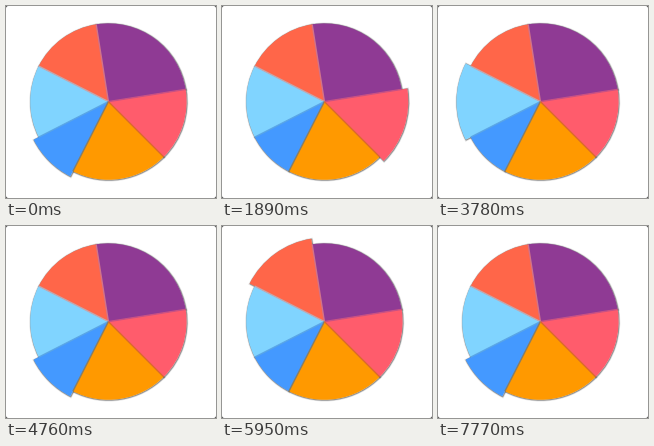
Recreate the animation shown at these times as a matplotlib script. Size 210x192 px, loop 8000 ms.

```python
import math

import matplotlib.pyplot as plt
from matplotlib.animation import FuncAnimation
from matplotlib.colors import to_rgb
from matplotlib.patches import FancyBboxPatch, Rectangle, Wedge

W, H, DPI = 210, 192, 100
LOOP, TICK, STEP = 8000, 20, 70
CENTER, RADIUS, POP = (102.4, 96.4), 78.2, 5.7
EASE_MS = 140

# name: (share in percent, colour), counter-clockwise from START
START = 9
SLICES = {
    "purple": (25, "#8f3a94"),
    "coral": (15, "#ff6649"),
    "sky": (15, "#80d4ff"),
    "blue": (10, "#4499ff"),
    "orange": (20, "#ff9900"),
    "pink": (15, "#ff5c6c"),
}

# (time in ms, slice that pops out)
CUES = [
    (-EASE_MS, "blue"), (1190, "orange"), (1750, "pink"), (2310, "purple"),
    (2870, "coral"), (3430, "sky"), (3990, "blue"), (4760, "orange"),
    (5320, "purple"), (5810, "coral"), (6370, "pink"), (6930, "sky"),
    (7560, "blue"),
]

fig = plt.figure(figsize=(W / DPI, H / DPI), dpi=DPI, facecolor="white")
ax = fig.add_axes([0, 0, 1, 1])
ax.set(xlim=(0, W), ylim=(0, H))
ax.axis("off")

# dark corners behind a rounded white card
ax.add_patch(Rectangle((0, 0), W, H, color="#555555", lw=0, zorder=0))
ax.add_patch(FancyBboxPatch((0, 0), W, H, fc="white", ec="none", zorder=0.1,
                            boxstyle="round,pad=0,rounding_size=2.5"))


def px(width):
    return width * 72 / DPI


def add_wedge(a0, a1, offset=(0, 0), **style):
    center = (CENTER[0] + offset[0], CENTER[1] + offset[1])
    return ax.add_patch(Wedge(center, RADIUS, a0, a1, **style))


def add_divider(angle, before, after):
    """Blend two neighbours along their edge, lit from above."""
    a = math.radians(angle)
    light = 0.2 * math.sin(a)
    tone = 1 if light > 0 else 0
    color = [(p + q) / 2 * (1 - abs(light)) + tone * abs(light)
             for p, q in zip(to_rgb(before), to_rgb(after))]
    x, y = CENTER
    ax.plot([x, x + RADIUS * math.cos(a)], [y, y + RADIUS * math.sin(a)],
            color=color, lw=px(1.4), solid_capstyle="butt", zorder=3)


parts = {}
angle, before = START, SLICES["pink"][1]
for name, (share, color) in SLICES.items():
    end = angle + share * 3.6
    shadows = [
        add_wedge(angle, end, (0.4, -0.4), fc="none", ec="black",
                  alpha=alpha, lw=px(width), zorder=1)
        for width, alpha in ((2.6, 0.1), (1.2, 0.35))
    ]
    face = add_wedge(angle, end, fc=color, ec="none", zorder=2)
    parts[name] = shadows + [face]
    add_divider(angle, before, color)
    angle, before = end, color


def levels(t):
    """How far each slice is popped out at time t, from 0 to 1."""
    i = max(k for k, (at, _) in enumerate(CUES) if at <= t)
    at, name = CUES[i]
    p = min((t - at) / EASE_MS, 1)
    grow = 1 - (1 - p) ** 3
    out = dict.fromkeys(SLICES, 0.0)
    if i:
        out[CUES[i - 1][1]] = 1 - grow
    out[name] = grow
    return out


def update(i):
    # the motion advances in coarse steps
    t = (i * TICK + TICK // 2) // STEP * STEP
    for name, level in levels(t).items():
        for wedge in parts[name]:
            wedge.set_radius(RADIUS + POP * level)
    return [w for group in parts.values() for w in group]


anim = FuncAnimation(fig, update, frames=LOOP // TICK, interval=TICK,
                     repeat=True, repeat_delay=0, blit=False)
plt.show()
```
